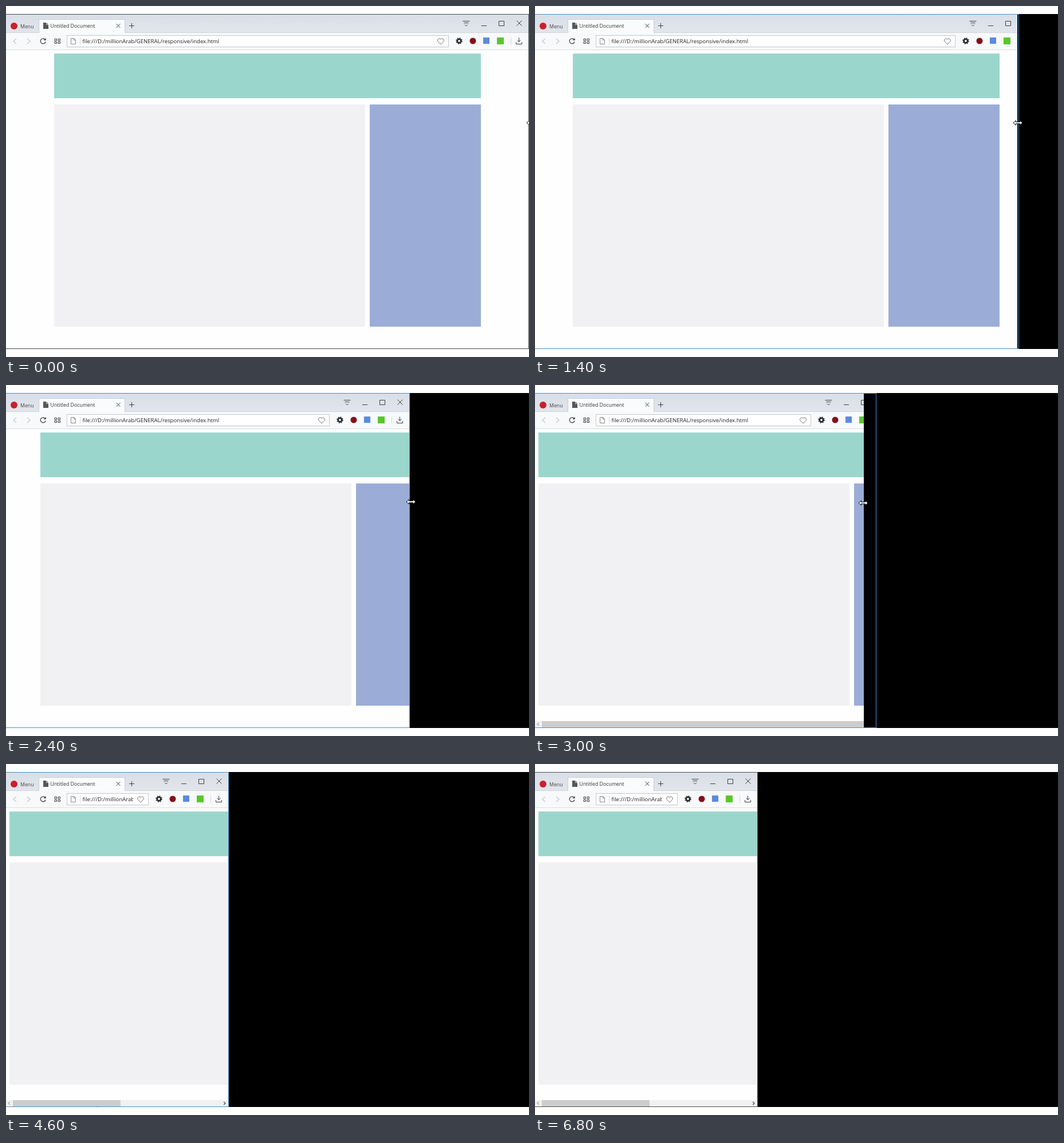
These frames come from a looping animation (913 by 613 pixels, 7000 ms). An HTML page:

```html
<!DOCTYPE html>
<html lang="en">
<head>
<meta charset="utf-8">
<title>Resizing a fixed layout</title>
<style>
  html, body { margin: 0; width: 100%; height: 100%; overflow: hidden; background: #fff; }
  svg { display: block; font-family: "Open Sans", "Noto Sans", sans-serif; }
  rect { shape-rendering: crispEdges; }
  .line { fill: none; stroke: #3c4043; }
  .faint { stroke: #c3c6ca; stroke-width: 1.2; }
</style>
</head>
<body>
<svg width="913" height="613" viewBox="0 0 913 613">
  <defs>
    <linearGradient id="titleBar" x2="0" y2="1">
      <stop stop-color="#d9dee7"/><stop offset="1" stop-color="#e2e5eb"/>
    </linearGradient>
    <clipPath id="screen"><rect y="14" width="913" height="585"/></clipPath>
    <clipPath id="visible"><rect id="visibleArea" y="14" height="585"/></clipPath>
    <clipPath id="urlClip"><rect id="urlArea" x="130" y="50" height="22"/></clipPath>
  </defs>

  <g clip-path="url(#screen)">
    <rect y="14" width="913" height="585"/>

    <g clip-path="url(#visible)">
      <rect y="14" width="913" height="585" fill="#fefefe"/>

      <g id="page">
        <rect y="83" width="745" height="77.5" fill="#9bd6cd"/>
        <rect y="172" width="543" height="388" fill="#f1f1f3"/>
        <rect x="551" y="172" width="194" height="388" fill="#9badd6"/>
      </g>

      <g id="scrollbar">
        <rect y="587" width="913" height="12" fill="#f1f1f1"/>
        <rect id="thumb" y="587" height="11"/>
        <path id="leftArrow" d="M7 590l-3 2.5 3 2.5" fill="none" stroke-width="1.2"/>
        <path id="rightArrow" d="M-8 590l3 2.5-3 2.5" fill="none" stroke-width="1.2"/>
      </g>

      <rect y="14" width="913" height="33" fill="url(#titleBar)"/>
      <rect y="46" width="913" height="31" fill="#f7f9fb"/>
      <rect y="46" width="913" height="1" fill="#cfd4dc"/>
      <rect y="76" width="913" height="1" fill="#dbdee2"/>

      <!-- tab strip -->
      <circle cx="14" cy="35" r="6" fill="#cc1f2d"/>
      <text x="25" y="38.5" font-size="8.74" fill="#444">Menu</text>
      <rect x="57" y="23" width="151" height="24" fill="#c8cdd6"/>
      <rect x="58" y="24" width="149" height="23" fill="#f9fbfc"/>
      <path d="M65 29h5.5l3.500 3.500v7.500h-9z" fill="#55575a"/>
      <path d="M70.500 29v3.500h3.500" fill="none" stroke="#f9fbfc" stroke-width=".7"/>
      <text x="77.500" y="38" font-size="8.8" fill="#333">Untitled Document</text>
      <path class="line" d="M192.500 31l7 7m0-7l-7 7M215 34.500h9m-4.500-4.500v9"/>

      <!-- toolbar -->
      <path class="line faint" d="M18 57l-5 4.500 5 4.500M37 57l5 4.500-5 4.500"/>
      <path class="line" d="M68.300 58.500a4.500 4.500 0 1 0 .8 4" stroke-width="1.3"/>
      <path d="M69.700 56v4h-4z" fill="#3c4043"/>
      <path class="line" d="M85 57.500h3.500v3h-3.500zM91 57.500h3.500v3h-3.500zM85 62.500h3.500v3h-3.500zM91 62.500h3.500v3h-3.500z"/>
      <rect id="fieldBorder" x="106" y="51" height="21" fill="#c3c7cd"/>
      <rect id="field" x="107" y="52" height="19" fill="#fff"/>
      <path d="M113.500 56.500h5l3 3v7h-8zM118.500 56.500v3h3" fill="none" stroke="#888"/>
      <rect x="129" y="55" width="1" height="13" fill="#d5d7da"/>
      <text x="133.500" y="65" font-size="9.57" fill="#222" clip-path="url(#urlClip)">file:///D:/millionArab/GENERAL/responsive/index.html</text>

      <!-- drawn leftwards from the window's right edge -->
      <g id="rightTools">
        <path class="line" d="M-115.500 26.500h12m-10 3h8M-112 32.500l2.500 2.500 2.500-2.500M-83 34.500h9M-52.500 26.500h9v8h-9zM-21.500 25.500l9 9m0-9l-9 9"/>
        <path d="M-154 67l-4.600-4.600a3 3 0 0 1 4.600-4.400 3 3 0 0 1 4.600 4.400z" fill="none" stroke="#777"/>
        <circle cx="-122" cy="61" r="3.200" fill="none" stroke="#25282b" stroke-width="2.600"/>
        <circle cx="-122" cy="61" r="5" fill="none" stroke="#25282b" stroke-width="1.500" stroke-dasharray="2 1.927"/>
        <circle cx="-98" cy="61" r="5.500" fill="#85101a"/>
        <rect x="-80" y="55" width="11" height="11" fill="#5b8bdc"/>
        <rect x="-56" y="55" width="12" height="12" fill="#59c72b"/>
        <rect x="-32" y="55" width="1" height="13" fill="#d5d7da"/>
        <path class="line" d="M-17.500 55.500v7m-3-3l3 3 3-3M-22.500 63v3.500h10v-3.500"/>
      </g>
    </g>

    <g id="outline">
      <rect id="topEdge" y="14" height="1"/>
      <rect id="bottomEdge" y="598" height="1"/>
      <rect id="rightEdge" y="14" width="1" height="585"/>
    </g>

    <path id="resizeCursor" d="M-8 0l4.500-4v2.500h7v-2.500l4.500 4-4.500 4v-2.500h-7v2.500z" fill="#fff" stroke="#000"/>
    <path id="arrowCursor" d="M.5.5v13l3-2.800 2.300 5 2-.9-2.200-4.800h4z" fill="#fff" stroke="#000"/>
  </g>
</svg>

<script>
const STEP = 200, STEPS = 35;
const PAGE_WIDTH = 751, FINAL_VIEW = 388, ARROW = 12;
const el = id => document.getElementById(id);
const set = (id, attrs) => {
  for (const name in attrs) el(id).setAttribute(name, attrs[name]);
};
const move = (id, x, y = 0) => set(id, { transform: `translate(${x} ${y})` });
const show = (id, visible) => set(id, { visibility: visible ? "visible" : "hidden" });

// Keys are [step, value...]; values between keys are interpolated linearly.
function at(keys, step) {
  const next = keys.findIndex(key => key[0] >= step);
  if (next < 0) return keys[keys.length - 1].slice(1);
  if (next === 0) return keys[0].slice(1);
  const a = keys[next - 1], b = keys[next];
  const k = (step - a[0]) / (b[0] - a[0]);
  return a.slice(1).map((v, i) => Math.round(v + (b[i + 1] - v) * k));
}

// painted width, visible width, outline position
const windowKeys = [
  [0, 913, 913, 912], [3, 905, 905, 904], [6, 874, 874, 873], [7, 874, 842, 844],
  [8, 815, 815, 814], [12, 705, 704, 704], [14, 622, 622, 621], [15, 622, 574, 595],
  [17, 389, 389, 388]
];
const contentKeys = [[0, 84], [6, 66], [7, 66], [8, 60], [13, 60], [14, 6]];
const resizeKeys = [[0, 917, 204], [6, 866, 204], [7, 843, 204], [12, 707, 204], [15, 573, 206], [17, 389, 206]];
const arrowKeys = [
  [18, 350, 260], [22, 190, 560], [23, 159, 598], [24, 193, 590], [25, 225, 588],
  [27, 369, 569], [28, 330, 575], [29, 250, 580], [30, 186, 191], [31, 184, 140], [32, 182, 95]
];

function draw(step) {
  const [width, visible, edge] = at(windowKeys, step);
  const [contentLeft] = at(contentKeys, step);
  const [arrowX, arrowY] = at(arrowKeys, step);
  const dragging = step >= 24 && step < 30;
  const view = step < 17 ? 704 : FINAL_VIEW;
  const track = view - 2 * ARROW;
  const thumbWidth = Math.round(track * view / PAGE_WIDTH);
  const maxOffset = track - thumbWidth;
  const offset = dragging ? Math.max(0, Math.min(maxOffset, arrowX - 193)) : 0;
  const scroll = Math.round(offset / maxOffset * (PAGE_WIDTH - view));

  set("visibleArea", { width: visible });
  set("urlArea", { width: width - 297 });
  set("fieldBorder", { width: width - 246 });
  set("field", { width: width - 248 });
  move("rightTools", width);
  move("page", contentLeft - scroll);

  show("scrollbar", step >= 14);
  set("thumb", { x: ARROW + offset, width: thumbWidth, fill: dragging ? "#5d5d5d" : "#cdcdcd" });
  set("leftArrow", { stroke: offset > 0 ? "#444" : "#a5a5a5" });
  set("rightArrow", { stroke: offset < maxOffset ? "#444" : "#a5a5a5" });
  move("rightArrow", view);

  set("outline", { fill: step === 0 || step === 34 ? "#4b4d50" : "#4b8fc9" });
  set("topEdge", { width: edge + 1 });
  set("bottomEdge", { width: edge + 1 });
  set("rightEdge", { x: edge });

  show("resizeCursor", step < 18);
  move("resizeCursor", ...at(resizeKeys, step));
  show("arrowCursor", step >= 18 && step < 34);
  move("arrowCursor", arrowX, arrowY);
}

const start = performance.now();
function tick() {
  draw(Math.floor((performance.now() - start) / STEP) % STEPS);
  requestAnimationFrame(tick);
}
tick();
</script>
</body>
</html>
```
